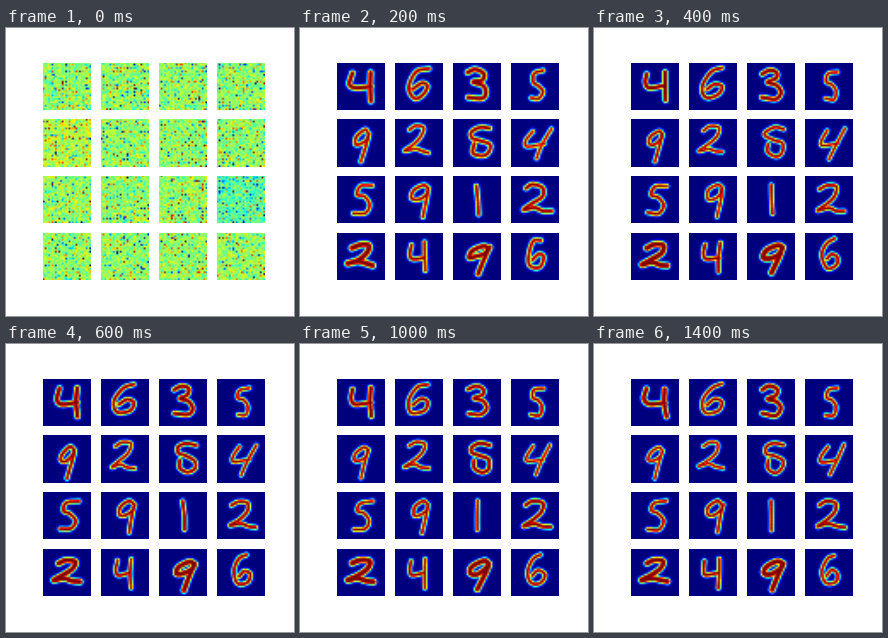
A matplotlib script for the animation above (1.5 s loop, 288 by 288 pixels).

```python
import numpy as np
import matplotlib.pyplot as plt
from matplotlib.animation import FuncAnimation

FRAMES, STEP = 15, 100
CELLS, BOX = 28, 47.27  # grid cells per tile, tile size in pixels
GY, GX = (np.mgrid[:CELLS, :CELLS] + 0.5) * BOX / CELLS

# Upright strokes in a unit box, y downwards
GLYPHS = {
    1: [[(0, 0), (0.3, 0.5), (0.5, 1)]],
    2: [[(0.08, 0.15), (0.35, 0), (0.7, 0.08), (0.65, 0.4), (0.35, 0.7),
         (0.02, 0.93), (0.4, 0.85), (0.7, 0.95), (1, 1)]],
    3: [[(0, 0.1), (0.4, 0), (0.8, 0.1), (0.75, 0.3), (0.3, 0.43),
         (0.8, 0.52), (1, 0.75), (0.7, 0.97), (0, 0.92)]],
    4: [[(0.1, 0.05), (0, 0.38), (0.2, 0.56), (0.95, 0.5)],
        [(1, 0), (0.95, 0.5), (0.97, 1)]],
    5: [[(1, 0), (0.25, 0.06), (0.08, 0.32), (0.55, 0.43), (0.88, 0.68),
         (0.7, 0.95), (0, 0.94)]],
    6: [[(0.75, 0), (0.3, 0.12), (0, 0.5), (0.08, 0.85), (0.4, 1),
         (0.88, 0.88), (0.95, 0.62), (0.6, 0.52), (0.25, 0.7)]],
    8: [[(1, 0.07), (0.5, 0), (0.08, 0.15), (0.1, 0.33), (0.5, 0.43),
         (0.95, 0.58), (0.95, 0.85), (0.6, 1), (0.2, 0.85), (0.2, 0.58)]],
    9: [[(1, 0.1), (0.6, 0), (0.05, 0.18), (0.05, 0.42), (0.45, 0.46),
         (0.9, 0.3), (1, 0.1), (0.98, 0.4), (0.95, 1)]],
}

# digit, left, right, top, bottom, slant, stroke radius (pixels)
TILES = [
    (4, 14, 34, 10, 38, -1, 2.6), (6, 14, 34, 6, 35, 6, 2.1),
    (3, 15, 33, 8, 37, 0, 2.4), (5, 20, 32, 10, 38, 0, 2.0),
    (9, 16, 28, 12, 42, 8, 2.0), (2, 11, 35, 7, 33, 4, 1.9),
    (8, 17, 36, 8, 37, 0, 2.2), (4, 14, 32, 10, 39, 14, 1.9),
    (5, 18, 34, 10, 39, 3, 2.0), (9, 17, 31, 10, 41, 5, 2.0),
    (1, 24, 25, 10, 38, 0, 2.1), (2, 12, 39, 10, 36, 0, 2.2),
    (2, 12, 38, 12, 33, 4, 3.0), (4, 14, 30, 11, 39, 0, 2.1),
    (9, 15, 31, 13, 41, 11, 2.9), (6, 17, 33, 7, 36, 0, 2.0),
]


def spline(pts, n=14):
    """Catmull-Rom curve through the points."""
    p = np.vstack([2 * pts[0] - pts[1], pts, 2 * pts[-1] - pts[-2]])
    t = np.linspace(0, 1, n)[:, None]
    return np.vstack([
        b + t * (c - a) / 2 + t**2 * (a - 2.5 * b + 2 * c - d / 2)
        + t**3 * (1.5 * (b - c) + (d - a) / 2)
        for a, b, c, d in zip(p, p[1:], p[2:], p[3:])])


def draw_digit(index, frame):
    """Ink map of one tile: a glyph that settles but keeps trembling."""
    digit, left, right, top, bottom, slant, radius = TILES[index]
    rng = np.random.default_rng(100 * index + frame)
    early = max(0, 3 - frame)
    edge = radius + 0.1 * early + rng.normal(0, 0.1)
    soft = 0.62 + 0.06 * early
    dist = np.full((CELLS, CELLS), BOX)
    for stroke in GLYPHS[digit]:
        x, y = np.array(stroke).T
        pts = np.column_stack([left + (right - left) * x + slant * (0.5 - y),
                               top + (bottom - top) * y])
        curve = spline(pts + rng.normal(0, 0.4 + 0.25 * early, pts.shape))
        gap = np.hypot(GX[..., None] - curve[:, 0], GY[..., None] - curve[:, 1])
        dist = np.minimum(dist, gap.min(axis=2))
    ink = 1.06 / (1 + np.exp((dist - edge) / soft))
    return np.clip(ink, 0, 1)


def draw_noise(index):
    """Mostly flat field with a faint lattice and a few strong cells."""
    rng = np.random.default_rng(index + 7)
    mean = {4: 0.57, 11: 0.46}.get(index, 0.53)
    odd = np.arange(CELLS) % 2
    gain = np.outer(0.6 + 0.6 * odd, 0.6 + 0.6 * odd)
    return np.clip(mean + 0.09 * gain * rng.standard_t(3, gain.shape), 0, 1)


fig, axes = plt.subplots(4, 4, figsize=(4, 4), dpi=72, facecolor="white")
fig.subplots_adjust(left=0.125, right=0.9, bottom=0.125, top=0.88,
                    wspace=0.2, hspace=0.2)
tiles = []
for i, ax in enumerate(axes.flat):
    ax.axis("off")
    tiles.append(ax.imshow(draw_noise(i), cmap="jet", vmin=0, vmax=1,
                           interpolation="bilinear",
                           interpolation_stage="rgba"))


def update(frame):
    for i, tile in enumerate(tiles):
        tile.set_data(draw_digit(i, frame) if frame else draw_noise(i))
    return tiles


anim = FuncAnimation(fig, update, frames=FRAMES, interval=STEP, repeat=True,
                     repeat_delay=0)
plt.show()
```
